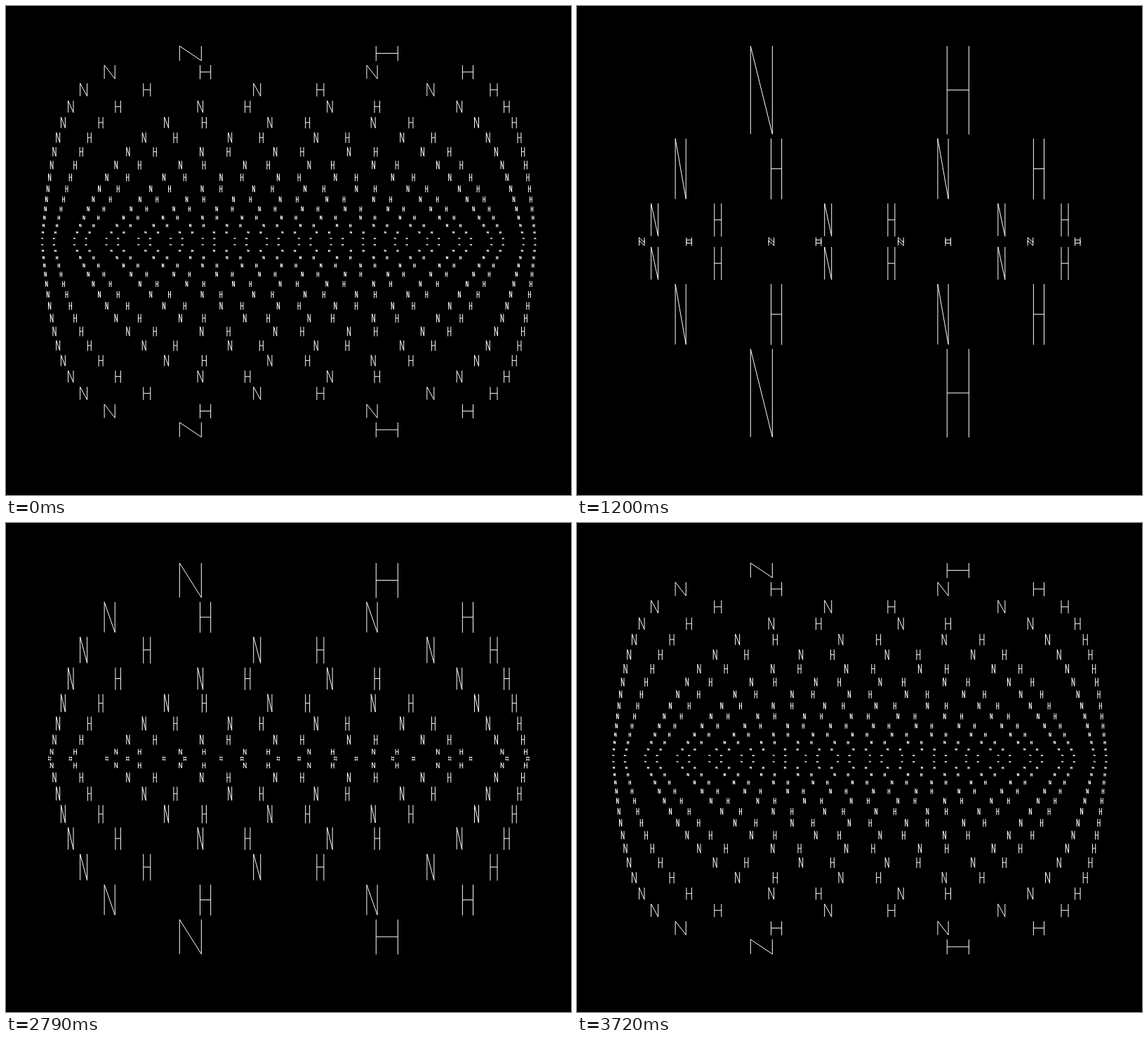
Write an HTML page that moves like this. It is 805x696 px and loops after 3.75 s.

```html
<!DOCTYPE html>
<html lang="en">
<head>
<meta charset="utf-8">
<title>NH field</title>
<style>
  html, body { margin: 0; width: 100%; height: 100%; overflow: hidden; background: #000; }
  svg { display: block; }
</style>
</head>
<body>
<svg width="805" height="696" viewBox="0 0 805 696">
  <rect width="805" height="696" fill="#000"/>
  <path id="letters" fill="none" stroke="#fff" stroke-width="1" stroke-linejoin="bevel"/>
</svg>
<script>
const LOOP = 3750, STEP = 30;
const CENTER_X = 402.8, TOP = 57, BOTTOM = 613.5;
const GAP = 6.4, STACK = 282.3, LAST_TOP = 279.3;
const PAIR = 729, SPREAD = 266, LETTER = 29.5, TRIM = 0.05;

// Density of the stack over half a loop: [ms, rows]
const KEYS = [
  [0, 17.19], [195, 17.16], [340, 16.98], [525, 16.1], [765, 13.03], [945, 9.33],
  [1215, 4.18], [1305, 3.35], [1500, 2.5], [1665, 2.3], [1815, 2.28], [1875, 2.28]
];

const secant = i => (KEYS[i + 1][1] - KEYS[i][1]) / (KEYS[i + 1][0] - KEYS[i][0]);

function slope(i) {
  if (i === 0 || i === KEYS.length - 1) return 0;
  const before = KEYS[i][0] - KEYS[i - 1][0];
  const after = KEYS[i + 1][0] - KEYS[i][0];
  return (secant(i - 1) * after + secant(i) * before) / (before + after);
}

function density(time) {
  let i = 0;
  while (i < KEYS.length - 2 && time > KEYS[i + 1][0]) i++;
  const [t0, a] = KEYS[i], [t1, b] = KEYS[i + 1];
  const span = t1 - t0, s = (time - t0) / span, r = 1 - s;
  return a * r * r * (1 + 2 * s) + b * s * s * (3 - 2 * s)
    + span * s * r * (slope(i) * r - slope(i + 1) * s);
}

const fix = v => v.toFixed(2);

function letterN(x, y, w, h) {
  const l = fix(x - w / 2), r = fix(x + w / 2), t = fix(y), b = fix(y + h);
  return `M${l} ${b}V${t}L${r} ${b}V${t}`;
}

function letterH(x, y, w, h) {
  const l = fix(x - w / 2), r = fix(x + w / 2), t = fix(y), b = fix(y + h + 0.5);
  return `M${l} ${t}V${b}M${r} ${t}V${b}M${l} ${fix(y + h / 2)}H${r}`;
}

function row(pairs, y, h) {
  const scale = 1 / (pairs - TRIM), w = LETTER * scale;
  const left = CENTER_X - ((pairs - 1) * PAIR + SPREAD) * scale / 2;
  let d = '';
  for (let i = 0; i < pairs; i++) {
    const x = left + i * PAIR * scale;
    d += letterN(x, y, w, h) + letterH(x + SPREAD * scale, y, w, h);
  }
  return d;
}

function field(rows) {
  const shrink = 2 * (STACK - GAP * (rows - 1)) / (rows * (rows - 1));
  let d = '', offset = 0;
  for (let n = 1; n < rows && offset < LAST_TOP; n++) {
    const h = shrink * (rows - n);
    d += row(n, TOP + offset, h) + row(n, BOTTOM - offset - h, h);
    offset += h + GAP;
  }
  return d;
}

const letters = document.getElementById('letters');

function draw(ms) {
  const t = Math.floor((ms % LOOP) / STEP) * STEP;
  const half = LOOP / 2;
  const folded = half - Math.abs((t + STEP / 2) % LOOP - half);
  letters.setAttribute('d', field(density(folded)));
}

let start;
function tick(now) {
  start ??= now;
  draw(now - start);
  requestAnimationFrame(tick);
}
draw(0);
requestAnimationFrame(tick);
</script>
</body>
</html>
```
